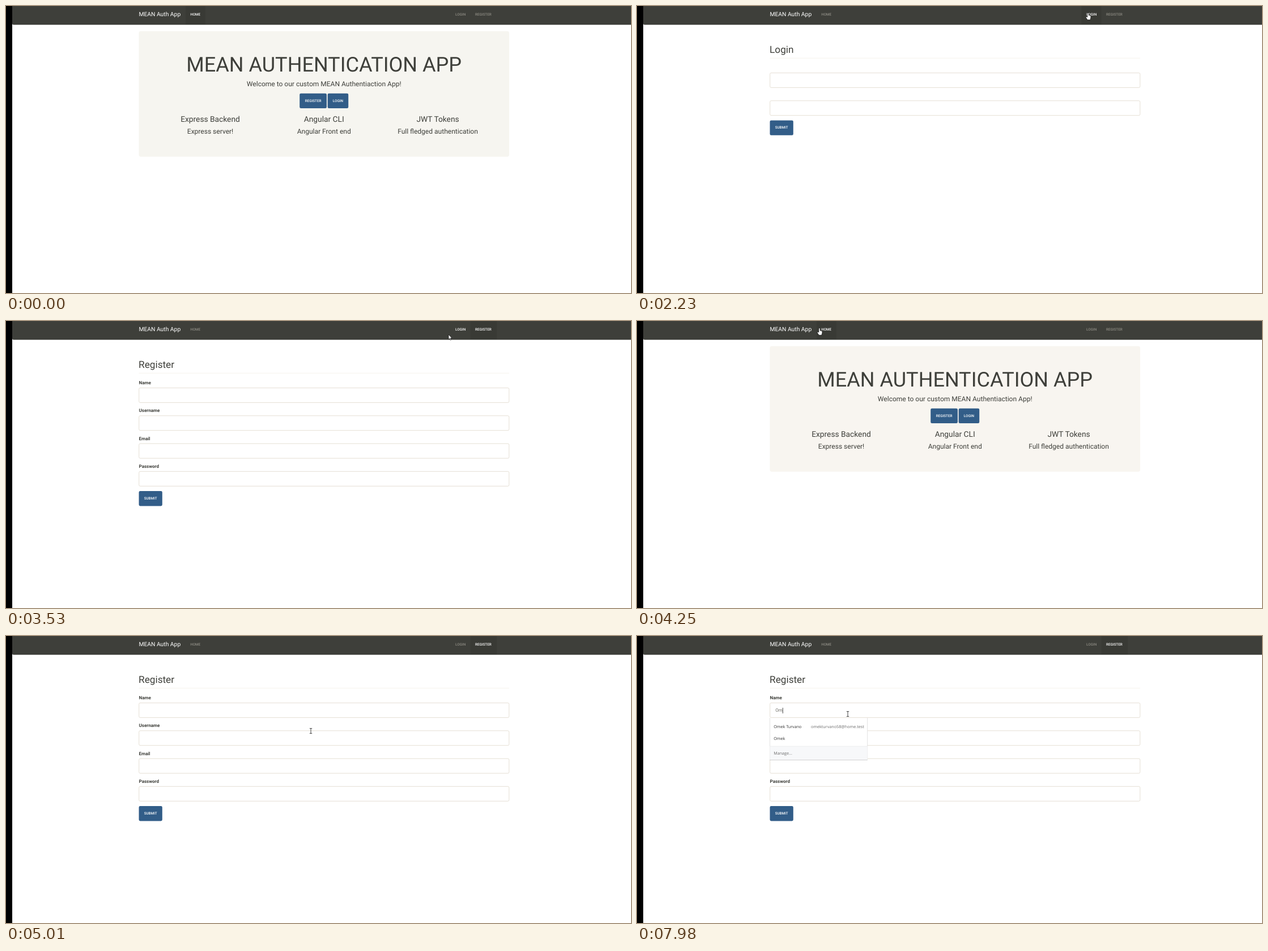
These frames come from a looping animation (1103 by 508 pixels, 8 s). An HTML page:

```html
<!DOCTYPE html>
<html lang="en">
<head>
<meta charset="utf-8">
<title>MEAN Auth App</title>
<style>
  html, body { margin: 0; width: 100%; height: 100%; overflow: hidden; background: #fff; }
  svg { display: block; width: 100%; height: 100%; }
  text { font-family: Roboto, Arial, sans-serif; fill: #3e3f3a; text-rendering: geometricPrecision; white-space: pre; }
  .nav, .btn { font-size: 6.31px; font-weight: 500; }
  .nav { fill: #8e8c84; }
  .nav.lit, .btn { fill: #fff; }
  .brand { font-size: 10.32px; fill: #fff; }
  .h1 { font-size: 36.1px; }
  .h2 { font-size: 17.2px; }
  .h3 { font-size: 13.76px; }
  .lead { font-size: 12.04px; }
  .label { font-size: 8.03px; font-weight: 700; }
  .typed { font-size: 8.03px; fill: #6f6e67; }
  .menu { font-size: 7.2px; font-family: "Open Sans", "Noto Sans", sans-serif; fill: #333; }
  .menu.dim { fill: #6d6d6d; }
  .mid { text-anchor: middle; }
</style>
</head>
<body>
<svg id="stage" viewBox="0 0 1103 508" preserveAspectRatio="none"></svg>
<script>
const LOOP = 8000;
const LEFT = 234.5, WIDTH = 653.5, ROW = 49.3;
const BLUE = '#325d88', BLUE_HOVER = '#264666';

const rect = (x, y, w, h, fill, extra = '') =>
  `<rect x="${x}" y="${y}" width="${w}" height="${h}" fill="${fill}" ${extra}/>`;
const text = (x, y, cls, s, extra = '') =>
  `<text x="${x}" y="${y}" class="${cls}" ${extra}>${s}</text>`;
const button = (x, y, w, s, id = '') =>
  rect(x, y, w, 26.3, BLUE, `rx="2.3" ${id && `id="${id}"`}`) +
  text(x + w / 2, y + 14.9, 'btn mid', s);

const links = {
  home: { x: 317, w: 35, tx: 325.2, label: 'HOME' },
  login: { x: 784.5, w: 35, tx: 793, label: 'LOGIN' },
  register: { x: 819.5, w: 46.5, tx: 828, label: 'REGISTER' }
};

function navbar() {
  let s = rect(0, 0, 11, 508, '#000') +
    '<path d="M11 0H1103V33.2H13.3Q11 33.2 11 30.9Z" fill="#3e3f3a"/>';
  for (const [key, l] of Object.entries(links)) {
    s += rect(l.x, 0, l.w, 32.6, '#393a35', `id="bg-${key}"`);
    s += text(l.tx, 16.8, 'nav', l.label, `id="nav-${key}"`);
  }
  return s + text(234.4, 17.8, 'brand', 'MEAN Auth App');
}

function homePage() {
  const columns = [
    [360.5, 'Express Backend', 'Express server!'],
    [561.2, 'Angular CLI', 'Angular Front end'],
    [762, 'JWT Tokens', 'Full fledged authentication']
  ];
  return rect(LEFT, 44.5, WIDTH, 222.2, '#f6f5f0', 'rx="3.4" id="jumbo"') +
    text(561.2, 116.1, 'h1 mid', 'MEAN AUTHENTICATION APP') +
    text(561.2, 141.6, 'lead mid', 'Welcome to our custom MEAN Authentiaction App!') +
    button(518.2, 154.8, 47.7, 'REGISTER', 'go-register') +
    button(567.6, 154.8, 36.6, 'LOGIN', 'go-login') +
    columns.map(([x, a, b]) => text(x, 204.9, 'h3 mid', a) + text(x, 226.2, 'lead mid', b)).join('');
}

function formPage(title, fields) {
  const rows = fields.map((f, i) =>
    text(LEFT, 111.9 + i * ROW, 'label', f) +
    rect(LEFT + .2, 118.4 + i * ROW, WIDTH - .4, 26, '#fff', 'rx="2.2" stroke="#dfd7ca" stroke-width=".8"'));
  return text(LEFT - .4, 82.9, 'h2', title) +
    rect(LEFT, 91.8, WIDTH, .8, '#f3efe8') + rows.join('') +
    button(LEFT, 103.9 + fields.length * ROW, 41.3, 'SUBMIT');
}

function suggestions() {
  return rect(234.3, 145.4, 172.4, 74.6, '#000', 'opacity=".12" rx="1"') +
    rect(234, 145, 173, 74.6, '#c9c9c9') +
    rect(234.5, 145, 172, 74, '#fff') +
    rect(234.5, 195, 172, 24, '#f7f8fa') +
    rect(234.5, 194.8, 172, .6, '#e4e5e7') +
    text(241.2, 162.8, 'menu', 'Omek Turvano') +
    text(307, 162.8, 'menu dim', 'omekturvano58@home.test') +
    text(241.2, 183.6, 'menu', 'Omek') +
    text(241.2, 210.3, 'menu dim', 'Manage...');
}

const outline = 'fill="#fff" stroke="#111" stroke-width=".7" stroke-linejoin="round"';
const pointers = {
  arrow: `<path d="M0 0V8.6L2 6.8L3.3 9.8L4.6 9.2L3.4 6.3H6Z" ${outline}/>`,
  hand: `<path d="M-1.2 7.6V1.2Q-1.2 0 0 0Q1.2 0 1.2 1.2V4.4L4.2 5.2Q5 5.5 5 6.5L4.8 9L3.8 12.6H-.9L-3.8 8.3Q-4 6.9 -2.9 6.7Z" ${outline}/>`,
  beam: '<path d="M-2.2 -4.4H2.2M0 -4.4V4.4M-2.2 4.4H2.2" fill="none" stroke="#333" stroke-width=".9"/>'
};

const group = (id, body) => `<g id="${id}">${body}</g>`;
const stage = document.getElementById('stage');
stage.innerHTML = navbar() +
  group('home', homePage()) +
  group('login', formPage('Login', ['Username', 'Password'])) +
  group('register', formPage('Register', ['Name', 'Username', 'Email', 'Password'])) +
  group('menu', suggestions()) +
  text(244.3, 134.3, 'typed', '', 'id="typed"') +
  rect(244.3, 127, .8, 10, '#222', 'id="caret"') +
  group('pointer', Object.entries(pointers).map(([k, p]) => group(k, p)).join(''));

const $ = id => document.getElementById(id);
const show = (id, on) => $(id).setAttribute('display', on ? 'inline' : 'none');

const pages = [[0, 'home'], [2140, 'login'], [2917, 'register'], [4250, 'home'], [4934, 'register']];

// Pointer moves: start, end, steps, x, y
const moves = [
  [70, 680, 9, 552, 171],
  [1520, 1520, 1, 574, 137],
  [1600, 1990, 6, 796, 12],
  [2610, 2763, 3, 848, 11],
  [3380, 3530, 3, 781, 24],
  [3610, 4080, 7, 322, 12.5],
  [4480, 4785, 5, 538, 168],
  [5490, 5640, 3, 372, 138]
];

const smooth = p => p * p * (3 - 2 * p);
const inBox = (p, x, y, w, h) => p.x >= x && p.x <= x + w && p.y >= y && p.y <= y + h;

function pointerAt(t) {
  let x = 1027, y = 475;
  for (const [t0, t1, n, tx, ty] of moves) {
    if (t < t0) break;
    const gap = n > 1 ? (t1 - t0) / (n - 1) : 1;
    const k = Math.min(n, Math.floor((t - t0) / gap + 1e-6) + 1);
    const p = smooth(k / n);
    x += (tx - x) * p;
    y += (ty - y) * p;
  }
  return { x, y };
}

function pointerKind(p, page, overLink) {
  if (overLink) return 'hand';
  if (page === 'home') {
    if (inBox(p, 518, 155, 86, 26)) return 'hand';
    const lines = [[319, 84, 485, 40], [425, 131, 273, 13], [526, 193, 71, 15], [691, 193, 142, 36]];
    return lines.some(l => inBox(p, ...l)) ? 'beam' : 'arrow';
  }
  const count = page === 'login' ? 2 : 4;
  for (let i = 0; i < count; i++)
    if (inBox(p, LEFT, 118 + i * ROW, WIDTH, 27)) return 'beam';
  return 'arrow';
}

function draw(t) {
  const page = pages.filter(p => t >= p[0]).pop()[1];
  const p = pointerAt(t);
  let overLink = false;

  for (const name of ['home', 'login', 'register']) {
    const l = links[name];
    const over = inBox(p, l.x - 5, 0, l.w + 5, 33);
    overLink = overLink || inBox(p, l.x, 0, l.w, 33);
    show(name, page === name);
    show('bg-' + name, page === name);
    $('nav-' + name).classList.toggle('lit', page === name || over);
  }
  $('jumbo').setAttribute('fill', t < 4250 ? '#f6f5f0' : '#f8f5f0');
  $('go-register').setAttribute('fill', inBox(p, 518, 155, 48, 26) ? BLUE_HOVER : BLUE);
  $('go-login').setAttribute('fill', inBox(p, 567.6, 155, 36.6, 26) ? BLUE_HOVER : BLUE);
  $('login').querySelectorAll('.label').forEach(e => e.setAttribute('opacity', t < 2300 ? 0 : 1));

  show('menu', t >= 6280);
  const typed = $('typed');
  typed.textContent = t < 7750 ? '' : t < 7980 ? 'O' : 'Om';
  const shift = typed.textContent ? typed.getComputedTextLength() : 0;
  $('caret').setAttribute('x', 244.3 + shift);
  show('caret', t >= 6190 && !(t >= 6740 && t < 7200));

  const kind = pointerKind(p, page, overLink);
  for (const k in pointers) show(k, k === kind);
  show('pointer', t >= 70);
  $('pointer').setAttribute('transform', `translate(${p.x} ${p.y})`);
}

const start = performance.now();
function tick() {
  draw((performance.now() - start) % LOOP);
  requestAnimationFrame(tick);
}
draw(0);
requestAnimationFrame(tick);
</script>
</body>
</html>
```
